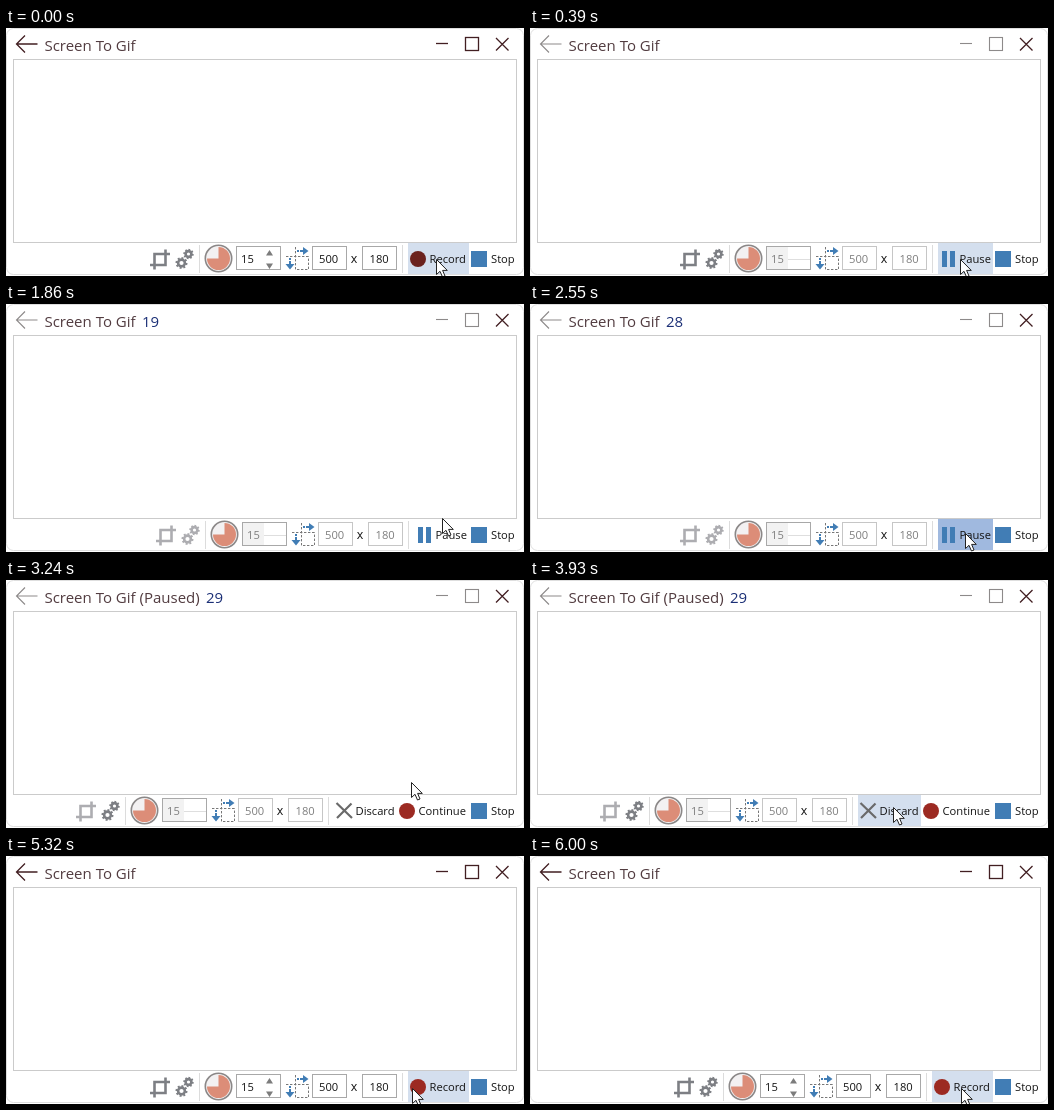
Write an HTML page that moves like this. It is 518 px wide and 248 px high and loops after 6070 ms.

```html
<!DOCTYPE html>
<html lang="en">
<head>
<meta charset="utf-8">
<title>Screen recorder</title>
<style>
  html, body { margin: 0; width: 100%; height: 100%; overflow: hidden; background: #fff; }
  svg { display: block; width: 518px; height: 248px; font: 11.2px "Open Sans", "Noto Sans", sans-serif; fill: #141414; }
  .line { fill: none; stroke: #421f22; stroke-width: 1.3; }
  .title { font-size: 15px; fill: #523c40; }
  .count { fill: #1b2f76; }
  .sep { stroke: #dcdcdc; }
  .field { fill: #fff; stroke: #a8a8a8; }
  .blue { fill: #417db5; }
  .grey { fill: none; stroke: #7d7f84; stroke-width: 2.6; }
  .light { stroke: #adadb1; }
  .off .field { stroke: #c6c6c6; }
  .off .rate { stroke: #a8a8a8; }
  .off .value { fill: #7e7e7e; }
  .off .spin, .on-off { display: none; }
  .off .on-off { display: inline; }
  .dim .fades { stroke: #8d8a8a; stroke-width: 1.1; }
  .field.focus { stroke: #7fb2dc; }
</style>
</head>
<body>
<svg viewBox="0 0 518 248">
  <rect x=".5" y=".5" width="517" height="246" rx="7" fill="#fff" stroke="#dedede"/>
  <rect x="7.5" y="31.5" width="503" height="183" fill="#fff" stroke="#cbcbcb"/>

  <g id="bar" class="line">
    <path class="fades" d="M10.5 16H31.5M19 7.5 10.5 16 19 24.5"/>
    <path class="fades" d="M430 15.5H442"/>
    <rect class="fades" x="459.5" y="9.5" width="13" height="13"/>
    <path d="M490 10 502.5 22.5M502.5 10 490 22.5"/>
  </g>
  <text class="title" x="38.5" y="23"><tspan id="title">Screen To Gif</tspan></text>
  <text class="title count" id="count" y="23"></text>

  <g id="tools">
    <path id="crop" class="grey" d="M159.5 221.5V237H144M164 226H148.500V241.5"/>
    <g id="gears" class="grey">
      <circle cx="175.5" cy="235" r="3.4"/>
      <circle cx="175.5" cy="235" r="5" stroke-width="2" pathLength="16" stroke-dasharray="1"/>
      <circle cx="182.5" cy="226" r="2.9"/>
      <circle cx="182.5" cy="226" r="4.3" stroke-width="1.8" pathLength="16" stroke-dasharray="1"/>
    </g>
    <path class="sep" d="M193.5 217V245M396.5 217V245"/>
    <g transform="translate(212.5 230.5)">
      <circle r="13.2" fill="#f3f1f2" stroke="#8b8888" stroke-width="1.6"/>
      <path d="M0 0V-11.5A11.5 11.5 0 1 1 -11.5 0Z" fill="#dc8d78"/>
    </g>

    <rect class="field rate" x="230.5" y="218.5" width="44" height="23"/>
    <g class="on-off">
      <rect x="231" y="219" width="21" height="22" fill="#f2f2f2"/>
      <path d="M252 231.5H274" stroke="#dedede"/>
    </g>
    <path class="spin" d="M260 227.500 263.500 222 267 227.500ZM260 235.5 263.500 241 267 235.5Z" fill="#7c7c7c"/>
    <text class="value" x="235" y="235">15</text>

    <path d="M289.5 219V241.500H302.500V228.5M280 228.5H303" fill="none" stroke="#777" stroke-dasharray="2.4 1.6"/>
    <path class="blue" d="M291 222h2v2H291ZM294 222H297V219L302.5 223 297 227V224H294ZM283 230h2v2h-2ZM283 233h2V236h3.500L284 241.5 279.500 236H283Z"/>

    <rect class="field" x="306.5" y="218.5" width="34" height="23"/>
    <text class="value" x="313" y="235">500</text>
    <text x="344.800" y="235" font-size="12.5">x</text>
    <rect id="height" class="field" x="356.5" y="218.5" width="34" height="23"/>
    <text class="value" x="363.5" y="235">180</text>
  </g>

  <rect id="glow" y="215" height="31"/>
  <g id="idle">
    <circle id="dot" cx="412" cy="231" r="8"/>
    <text x="423.5" y="235">Record</text>
  </g>
  <g id="recording">
    <path class="blue" d="M412 223h5v16h-5ZM420 223h5v16h-5Z"/>
    <text x="429.5" y="235">Pause</text>
  </g>
  <g id="paused">
    <path d="M330.5 223 346 238M345.500 223.500 331 238" stroke="#6a6a6a" stroke-width="2.2"/>
    <text x="349.5" y="235">Discard</text>
    <circle cx="401" cy="231" r="8" fill="#9c2a22"/>
    <text x="412.5" y="235">Continue</text>
  </g>
  <rect class="blue" x="465" y="223" width="16" height="16"/>
  <text x="485" y="235">Stop</text>

  <path id="cursor" d="M.5.5V15.5L4 12.3 6.5 18 9 17 6.6 11.4H11.3Z" fill="#fff" stroke="#222"/>
</svg>
<script>
  const LOOP = 6070, FPS = 13;
  const START = 5, PAUSE = 37, DISCARD = 59;
  const $ = id => document.getElementById(id);

  // tick, x, y of the pointer
  const path = [
    [0, 430, 231], [5, 430, 231], [12, 434, 209], [17, 436, 197], [20, 437, 199],
    [28, 435, 228], [29, 435, 229], [37, 435, 229], [42, 405, 202], [44, 395, 192],
    [52, 358, 232], [64, 358, 232], [72, 434, 232], [75, 431, 232], [79, 431, 232]
  ];
  // left and right edges of each mode's buttons
  const buttons = {
    idle: [[402, 463]],
    recording: [[408, 463]],
    paused: [[328, 391], [391, 463]]
  };
  const shift = { idle: 0, recording: 6, paused: -74 };

  function pointer(tick) {
    const i = path.findIndex(p => p[0] > tick);
    const [a, ax, ay] = path[i - 1], [b, bx, by] = path[i];
    const f = (tick - a) / (b - a);
    return [Math.round(ax + (bx - ax) * f), Math.round(ay + (by - ay) * f)];
  }

  function glowColor(tick) {
    if (tick === 1) return '#bccde7';
    const pressed = (tick > 1 && tick < START) || (tick >= 33 && tick < PAUSE) || (tick >= 56 && tick < DISCARD);
    return pressed ? '#a0b9df' : '#d4dfee';
  }

  function draw(tick) {
    const mode = tick < START || tick >= DISCARD ? 'idle' : tick < PAUSE ? 'recording' : 'paused';
    const busy = mode !== 'idle', paused = mode === 'paused';
    const [x, y] = pointer(tick);

    for (const name in buttons) $(name).style.display = name === mode ? '' : 'none';
    $('tools').setAttribute('transform', `translate(${shift[mode]} 0)`);
    $('tools').classList.toggle('off', busy);
    $('bar').classList.toggle('dim', busy);
    $('crop').classList.toggle('light', tick > START && tick <= DISCARD);
    $('gears').classList.toggle('light', tick > START && tick < PAUSE);
    $('height').classList.toggle('focus', !busy && x >= 356 && x <= 391);
    $('dot').setAttribute('fill', tick < START ? '#6b221e' : '#9c2a22');

    $('title').textContent = paused ? 'Screen To Gif (Paused)' : 'Screen To Gif';
    $('count').setAttribute('x', paused ? 200 : 136);
    $('count').textContent = paused ? 29 : busy && tick > START ? Math.min(tick - START, 28) : '';

    const hot = y >= 215 && buttons[mode].find(([l, r]) => x >= l && x < r);
    $('glow').style.display = hot ? '' : 'none';
    if (hot) {
      $('glow').setAttribute('x', hot[0]);
      $('glow').setAttribute('width', hot[1] - hot[0]);
      $('glow').setAttribute('fill', glowColor(tick));
    }
    $('cursor').setAttribute('transform', `translate(${x} ${y})`);
  }

  const begin = performance.now();
  function frame() {
    const t = (performance.now() - begin) % LOOP;
    draw(Math.max(0, Math.floor((t - 5) * FPS / 1000)));
    requestAnimationFrame(frame);
  }
  frame();
</script>
</body>
</html>
```
